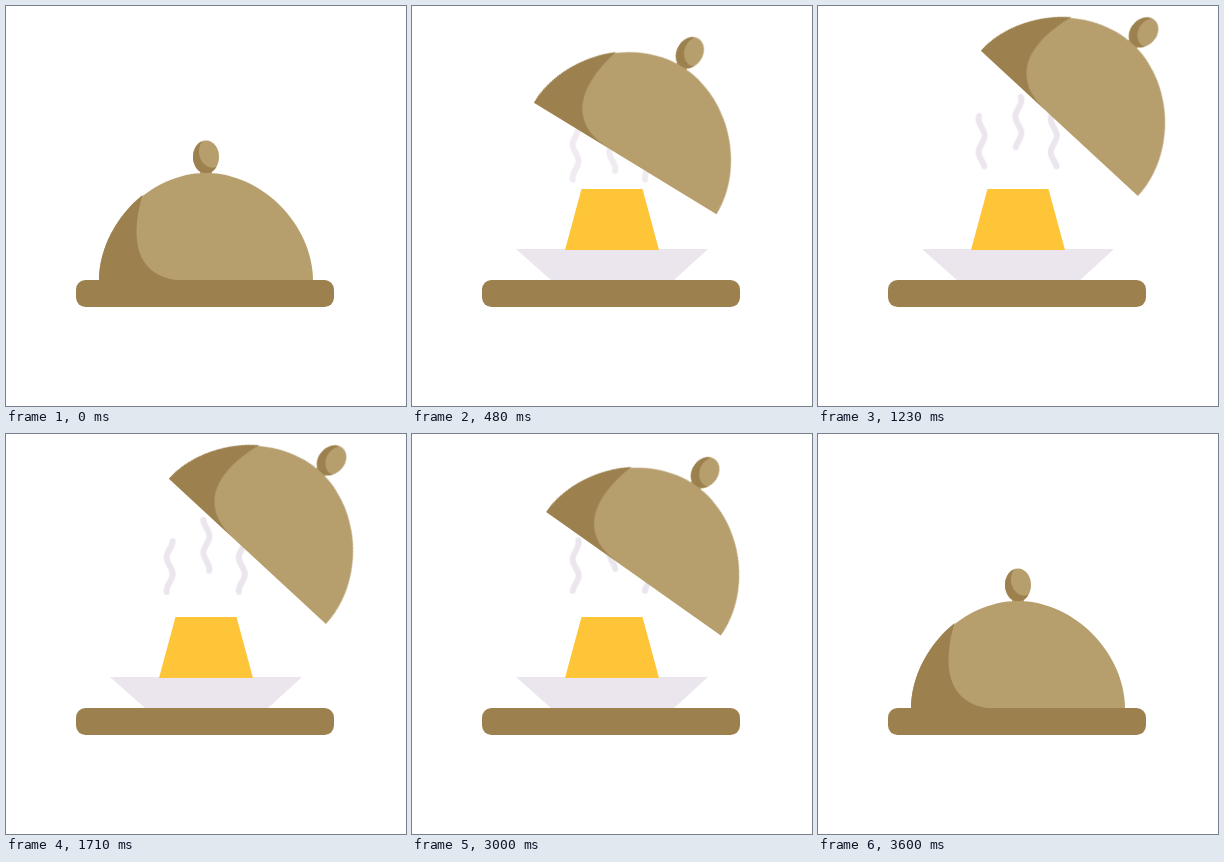
Recreate the animation shown at these times as an HTML page without scripts. Size 400 px wide and 400 px high, loop 5690 ms.

```html
<!DOCTYPE html>
<html lang="en">
<head>
<meta charset="utf-8">
<title>Cloche</title>
<style>
  html, body { margin: 0; width: 100%; height: 100%; overflow: hidden; background: #fff; }
  svg { display: block; width: 100%; height: 100%; }

  .light { fill: #b69f6d; }
  .dark { fill: #9c804e; }
  .cream { fill: #ebe6ed; }
  .pudding { fill: #ffc538; }

  .lid, .steam, .rise, .wave { animation: 5.69s linear infinite; }

  .lid { transform-origin: 543px 254px; animation-name: lid; }
  .steam { animation-name: fade; }
  .rise { animation-name: rise; }

  /* A dash shows a fixed window of a wave that slides through it. */
  .wave {
    d: path("M3-165c0 6-6 10.5-6 16.5s6 10.5 6 16.5s-6 10.5-6 16.5s6 10.5 6 16.5s-6 10.5-6 16.5s6 10.5 6 16.5s-6 10.5-6 16.5s6 10.5 6 16.5s-6 10.5-6 16.5s6 10.5 6 16.5s-6 10.5-6 16.5s6 10.5 6 16.5s-6 10.5-6 16.5s6 10.5 6 16.5");
    fill: none;
    stroke: #ebe6ed;
    stroke-width: 6;
    stroke-linecap: round;
    stroke-dasharray: 50.5 999;
    animation-name: wave;
  }

  @keyframes lid {
    0% { transform: translate(0, 0) rotate(0deg); animation-timing-function: ease; }
    19.25% { transform: translate(-35.7px, 81px) rotate(42.8deg); }
    48.42% {
      transform: translate(-35.7px, 81px) rotate(42.8deg);
      animation-timing-function: cubic-bezier(.38, 0, .65, .95);
    }
    63.27%, 100% { transform: translate(0, 0) rotate(0deg); }
  }
  @keyframes fade {
    0%, 4.2% { opacity: 0; }
    9.5%, 53.25% { opacity: 1; }
    56.4%, 100% { opacity: 0; }
  }
  @keyframes rise {
    0% { transform: translateY(var(--lift)); animation-timing-function: ease; }
    38.66%, 100% { transform: translateY(0); }
  }
  @keyframes wave {
    from { transform: translateY(-14.3px); stroke-dashoffset: -179.3px; }
    to { transform: translateY(142.2px); stroke-dashoffset: -22.8px; }
  }
</style>
</head>
<body>
<svg viewBox="0 0 400 400">
  <g class="steam">
    <g transform="translate(163.6 106.5)">
      <g class="rise" style="--lift: 25px"><path class="wave" pathLength="231"/></g>
    </g>
    <g transform="translate(200.4 84.5) scale(-1 1)">
      <g class="rise" style="--lift: 45px"><path class="wave" pathLength="231"/></g>
    </g>
    <g transform="translate(235.8 106.5)">
      <g class="rise" style="--lift: 25px"><path class="wave" pathLength="231"/></g>
    </g>
  </g>

  <path class="cream" d="M104 243H296L261 275H140Z"/>
  <path class="pudding" d="M169.5 183H230.5L247 244H153Z"/>

  <g class="lid">
    <rect class="light" x="194" y="163" width="12" height="6"/>
    <ellipse class="light" cx="200" cy="151" rx="13" ry="16.5"/>
    <path class="dark" d="M196 135.3A13 16.5 0 1 0 210.5 160.7C200 166 187 150 196 135.3Z"/>
    <path class="light" d="M93 275C93 219 144 167 200 167S307 219 307 275Z"/>
    <path class="dark" d="M93 275C93 241.5 111.5 209 136.5 189C124 232 128 274 181 275Z"/>
  </g>

  <rect class="dark" x="70" y="274" width="258" height="27" rx="9.5"/>
</svg>
</body>
</html>
```
